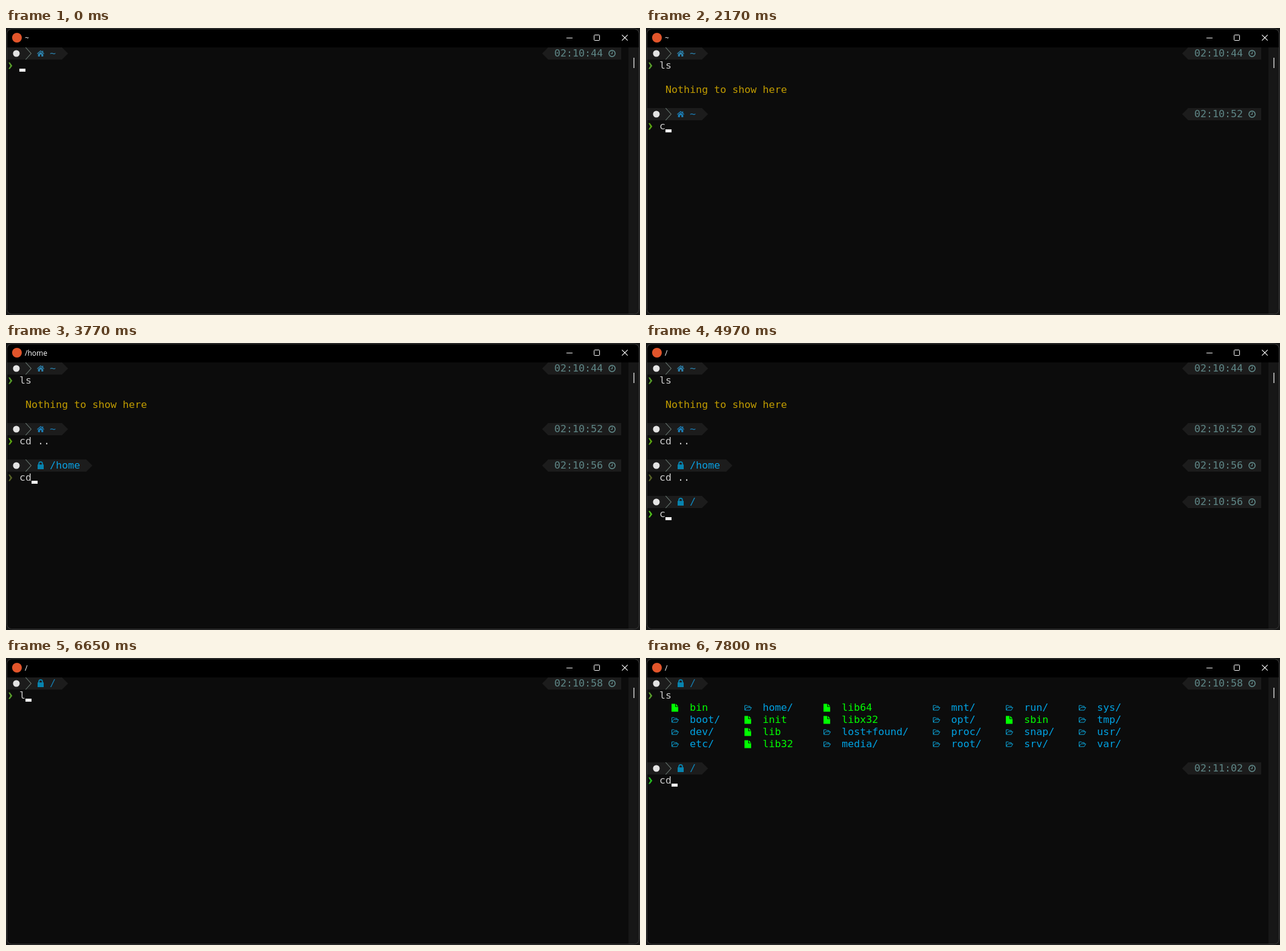
Recreate the animation shown at these times as an HTML page. Size 1043 px wide and 473 px high, loop 8000 ms.

```html
<!DOCTYPE html>
<html lang="en">
<head>
<meta charset="utf-8">
<title>Terminal</title>
<style>
  html, body { margin: 0; width: 100%; height: 100%; overflow: hidden; background: #181818; }
  svg { display: block; }
  text { font: 16.61px "DejaVu Sans Mono", monospace; fill: #ccc; white-space: pre; }
  #title { font: 12px "Open Sans", "Noto Sans", sans-serif; fill: #fff; }
  .time { fill: #5f8787; }
  .note { fill: #c19c00; }
  .dir { fill: #00a2e2; }
  .file { fill: #0f0; }
  .bar { fill: #1c1c1c; }
  .line { fill: none; }
</style>
</head>
<body>
<svg id="stage" width="1043" height="473" viewBox="0 0 1043 473">
  <rect x="1.5" y="1.5" width="1040" height="470" rx="8" fill="#0c0c0c"/>
  <path d="M2 32V10a8 8 0 0 1 8-8H1033a8 8 0 0 1 8 8V32Z" fill="#000"/>
  <path d="M1024 32H1041V463a8 8 0 0 1-8 8H1024Z" fill="#171717"/>
  <rect x="1032" y="49" width="2" height="17" fill="#9f9f9f"/>
  <rect x="1.5" y="1.5" width="1040" height="470" rx="8" fill="none" stroke="#3d3d3d"/>
  <circle cx="18" cy="16" r="8" fill="#e2552b"/>
  <text id="title" x="31" y="21"></text>
  <g fill="none" stroke="#fff">
    <path d="M922 16.5H932"/>
    <rect x="967.5" y="11.5" width="9" height="9" rx="1"/>
    <path d="M1013.3 11.3L1022.7 20.7M1022.7 11.3L1013.3 20.7" stroke-width="1.1"/>
  </g>
  <g id="screen"></g>
  <rect id="cursor" width="10" height="5" fill="#f2f2f2"/>
</svg>
<script>
const LOOP = 8000, CLEAR = 5680;
const screen = document.getElementById('screen');
const title = document.getElementById('title');
const cursor = document.getElementById('cursor');
const colX = c => 2 + c * 10, rowY = r => 32 + r * 20;

const parts = [];    // groups with a life span
const typed = [];    // commands with key times
const moves = [];    // cursor: [time, col, row]
const titles = [[0, '~'], [400, 'ls'], [540, '~'], [3370, '/home'],
                [4170, '/'], [6930, 'ls'], [7060, '/']];

function add(parent, tag, attrs, text) {
  const el = document.createElementNS('http://www.w3.org/2000/svg', tag);
  for (const k in attrs) el.setAttribute(k, attrs[k]);
  if (text) el.textContent = text;
  parent.appendChild(el);
  return el;
}

// A group whose origin is the top left of a row.
function block(row, from) {
  const el = add(screen, 'g', { transform: `translate(0 ${rowY(row)})` });
  parts.push({ el, from, to: from < CLEAR ? CLEAR : LOOP });
  return el;
}

const write = (g, col, text, attrs) => add(g, 'text', { x: colX(col), y: 15, ...attrs }, text);

const HOME = 'M57 4.8L59.6 7.1V5.4H61.2V8.5L63 10.1L62.2 11L57 6.4L51.8 11L51 10.1Z' +
             'M57 7.4L61.3 11.2V15H58.2V11.8H55.8V15H52.7V11.2Z';
const LOCK = 'M52 8.3H53.2V6.8a3.8 3.8 0 0 1 7.6 0V8.3H62V16H52Z' +
             'M55 8.3H59V6.9a2 2 0 0 0-4 0Z';

function prompt(row, from, path, time, tint, arrow) {
  const g = block(row, from);
  const end = colX(8 + path.length);
  const icon = path === '~' ? HOME : LOCK;
  add(g, 'path', { class: 'bar', d: `M2 0H${end}L${end + 10} 10L${end} 20H2Z` });
  add(g, 'circle', { cx: 17, cy: 10, r: 5.5, fill: '#e4e4e4' });
  add(g, 'path', { class: 'line', d: 'M32.3 0L41.3 10L32.3 20', stroke: '#6c7d76', 'stroke-width': 1.1 });
  add(g, 'path', { d: icon, 'fill-rule': 'evenodd', fill: path === '~' ? tint : '#0883ae' });
  write(g, 7, path, { style: `fill:${tint}` });
  add(g, 'path', { class: 'bar', d: 'M1012 0H892L882 10L892 20H1012Z' });
  write(g, 90, time, { class: 'time' });
  add(g, 'circle', { class: 'line', cx: 997, cy: 10, r: 5.1, stroke: '#5f8787', 'stroke-width': 1.6 });
  add(g, 'path', { class: 'line', d: 'M997.4 6.8V10.5H994.6', stroke: '#5f8787', 'stroke-width': 1.2 });
  add(g, 'path', { d: 'M4 24.8H6.4L10.4 30.2L6.4 35.6H4L7.2 30.2Z', fill: arrow });
  moves.push([from, 2, row + 1]);
}

function type(row, text, times) {
  const g = block(row, times[0]);
  typed.push({ el: write(g, 2, ''), text, times });
  times.forEach((t, i) => moves.push([t, 3 + i, row]));
}

function entry(g, col, name, isFile) {
  const x = colX(col);
  const kind = isFile ? 'file' : 'dir';
  if (isFile) {
    add(g, 'path', { class: kind, d: `M${x} 3.5H${x + 6}V8.6H${x + 11}V16.5H${x}Z` });
    add(g, 'path', { class: kind, d: `M${x + 7} 3.5L${x + 11} 7.6H${x + 7}Z` });
  } else {
    add(g, 'path', {
      class: 'line', stroke: '#0a9fd2', 'stroke-width': 1, 'stroke-linejoin': 'round',
      d: `M${x + .5} 13.6V6.2H${x + 4}L${x + 5} 7.4H${x + 9}V9.4` +
         `M${x + .5} 14L${x + 3.2} 9.6H${x + 11.5}L${x + 9} 14Z`
    });
  }
  write(g, col + 3, name, { class: kind });
}

prompt(0, 0, '~', '02:10:44', '#2d83ae', '#579c2c');
type(1, 'ls', [70, 170]);
moves.push([400, 0, 2]);
write(block(3, 540), 3, 'Nothing to show here', { class: 'note' });
prompt(5, 540, '~', '02:10:52', '#1b7fb8', '#5aa512');
type(6, 'cd ..', [2170, 2340, 2930, 3060, 3240]);
moves.push([3310, 0, 7]);
prompt(8, 3370, '/home', '02:10:56', '#0a9fe0', '#566026');
type(9, 'cd ..', [3600, 3770, 3840, 3950, 4060]);
prompt(11, 4170, '/', '02:10:56', '#0f8cc4', '#4fbf1c');
type(12, 'clear', [4970, 5070, 5180, 5290, 5400]);
moves.push([5630, 0, 13]);

prompt(0, CLEAR, '/', '02:10:58', '#167cae', '#579c2c');
type(1, 'ls', [6650, 6680]);
moves.push([6880, 0, 2], [7030, 0, 3]);
const cols = [4, 16, 29, 47, 59, 71];
const links = /^(s?bin|init|lib.*)$/;
[
  'bin home lib64 mnt run sys',
  'boot init libx32 opt sbin tmp',
  'dev lib lost+found proc snap usr',
  'etc lib32 media root srv var'
].forEach((line, i) => {
  const g = block(2 + i, i ? 7060 : 7030);
  line.split(' ').forEach((name, k) => {
    const isFile = links.test(name);
    entry(g, cols[k], isFile ? name : name + '/', isFile);
  });
});
prompt(7, 7060, '/', '02:11:02', '#0f86bb', '#27bd22');
type(8, 'cd', [7490, 7800]);

const latest = (list, t) => list.reduce((a, b) => b[0] <= t ? b : a);
const setText = (el, s) => { if (el.textContent !== s) el.textContent = s; };

function draw(t) {
  for (const p of parts)
    p.el.setAttribute('visibility', t >= p.from && t < p.to ? 'visible' : 'hidden');
  for (const c of typed)
    setText(c.el, c.text.slice(0, c.times.filter(k => k <= t).length));
  setText(title, latest(titles, t)[1]);
  const [, col, row] = latest(moves, t);
  cursor.setAttribute('x', colX(col));
  cursor.setAttribute('y', rowY(row) + 15);
}

const start = performance.now();
function tick() {
  draw((performance.now() - start) % LOOP);
  requestAnimationFrame(tick);
}
tick();
</script>
</body>
</html>
```
